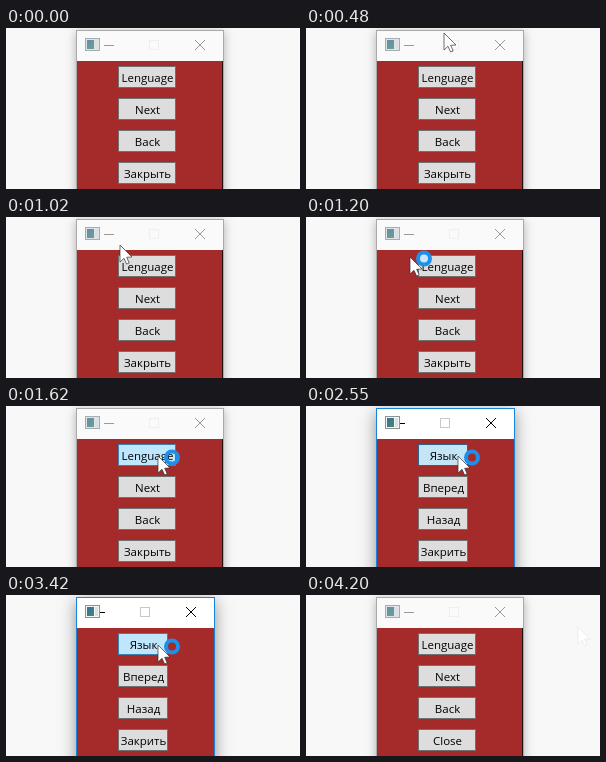
Animation, 294 px wide and 161 px high, one loop 4.29 s. Source, as an HTML page with a canvas:

```html
<!DOCTYPE html>
<html lang="ru">
<head>
<meta charset="utf-8">
<title>Language switch</title>
<style>
html, body { margin: 0; width: 100%; height: 100%; overflow: hidden; background: #f8f8f8; }
canvas { display: block; width: 294px; height: 161px; }
</style>
</head>
<body>
<canvas id="stage" width="294" height="161"></canvas>
<script>
const ctx = document.getElementById('stage').getContext('2d');
const LOOP = 4290, STEP = 30, PRESS = 90;
const CLICKS = [1890, 2550, 3090];
const ENTER = 180, BUSY = 1170, ARRIVE = 1200, LEAVE = 3390, RESET = 4200;
const BLUE = '#1f8fe8';

const LABELS = {
  start: ['Lenguage', 'Next', 'Back', 'Закрыть'],
  en: ['Lenguage', 'Next', 'Back', 'Close'],
  local: ['Язык', 'Вперед', 'Назад', 'Закрить']
};

const BUTTON = {
  idle: ['#ddd', '#707070'],
  hover: ['#bee6fd', '#3c7fb1'],
  pressed: ['#c4e5f6', '#2c628b']
};

function rect(x, y, w, h, color) {
  ctx.fillStyle = color;
  ctx.fillRect(x, y, w, h);
}

function frame(x, y, w, h, color) {
  ctx.strokeStyle = color;
  ctx.lineWidth = 1;
  ctx.strokeRect(x + 0.5, y + 0.5, w - 1, h - 1);
}

function line(x1, y1, x2, y2, color) {
  ctx.strokeStyle = color;
  ctx.lineWidth = 1;
  ctx.beginPath();
  ctx.moveTo(x1, y1);
  ctx.lineTo(x2, y2);
  ctx.stroke();
}

const ramp = (t, from, to) => Math.min(1, Math.max(0, (t - from) / (to - from)));
const mix = (a, b, k) => ({ x: a.x + (b.x - a.x) * k, y: a.y + (b.y - a.y) * k });

// Shrinking loops that drift left towards the first button
function swirl(t) {
  const k = ramp(t, ENTER, ARRIVE);
  const turn = 4 * Math.PI * k;
  return {
    x: 98 + 102 * (1 - k ** 1.6) + (76 - 70 * k) * Math.cos(turn),
    y: 27 + 24 * Math.cos(2 * Math.PI * (Math.min(t, ARRIVE) - 679) / 450)
  };
}

function pointerAt(t) {
  if (t < ENTER) return null;
  let p = swirl(t);
  p = mix(p, { x: 149, y: 44 }, ramp(t, ARRIVE, 1320));
  p = mix(p, { x: 152, y: 50 }, ramp(t, 1530, 1620));
  p = mix(p, { x: 272, y: 32 }, ramp(t, LEAVE, 3690) ** 3);
  return { x: Math.round(p.x), y: Math.round(p.y) };
}

// Each click holds the button briefly, then toggles the language on release
function stateAt(t) {
  if (t >= RESET) return { lang: 'en', active: false, pressed: false };
  const released = CLICKS.filter(c => t >= c + PRESS).length;
  return {
    lang: released === 0 ? 'start' : released % 2 ? 'local' : 'en',
    active: t >= CLICKS[0],
    pressed: CLICKS.some(c => t >= c && t < c + PRESS)
  };
}

function drawIcon(active) {
  ctx.globalAlpha = active ? 1 : 0.75;
  rect(79, 10, 15, 13, '#8b9298');
  rect(80, 11, 13, 11, '#f4f7f8');
  const g = ctx.createLinearGradient(81, 12, 88, 21);
  g.addColorStop(0, '#3b6f9c');
  g.addColorStop(1, '#3f8b72');
  rect(81, 12, 7, 9, g);
  rect(89, 12, 3, 9, '#d9e1e5');
  ctx.globalAlpha = 1;
}

function drawWindow(right, active) {
  const w = right - 70;
  ctx.save();
  ctx.shadowColor = `rgba(0,0,0,${active ? 0.42 : 0.3})`;
  ctx.shadowBlur = active ? 15 : 9;
  ctx.shadowOffsetY = active ? 4 : 2;
  rect(70, 2, w, 180, active ? '#fff' : '#fafafb');
  ctx.restore();

  rect(71, 33, w - 2, 128, '#a52a2a');
  frame(70, 2, w, 180, active ? '#1883d7' : '#a9a9a9');
  if (!active) rect(right - 2, 33, 1, 128, '#1c1010');

  const ink = active ? '#000' : '#999';
  const close = right - 24;
  line(Math.max(94, right - 120), 17.5, right - 110, 17.5, ink);
  frame(right - 75, 12, 10, 10, active ? '#c8c8c8' : '#efefef');
  line(close - 5, 12, close + 5, 22, ink);
  line(close + 5, 12, close - 5, 22, ink);
  drawIcon(active);
}

function drawButton(label, y, w, mode) {
  const [fill, edge] = BUTTON[mode];
  rect(112, y, w, 22, fill);
  frame(112, y, w, 22, edge);
  ctx.fillStyle = '#000';
  ctx.fillText(label, 112.5 + w / 2, y + 16);
}

function drawPointer({ x, y }) {
  const shape = [[0, 0], [0, 17], [4, 13.3], [6.6, 19], [9.2, 18], [6.7, 12.3], [12, 12]];
  ctx.beginPath();
  shape.forEach(([dx, dy]) => ctx.lineTo(x + dx, y + dy));
  ctx.closePath();
  ctx.fillStyle = '#fff';
  ctx.fill();
  ctx.lineWidth = 0.7;
  ctx.strokeStyle = x > 225 ? '#e6e6e6' : '#333';
  ctx.stroke();
}

function drawBusy({ x, y }, starting) {
  ctx.beginPath();
  ctx.arc(x + 14, y + 1.5, 6, 0, Math.PI * 2);
  if (starting) {
    ctx.fillStyle = '#c9e8fb';
    ctx.fill();
  }
  ctx.lineWidth = 4;
  ctx.strokeStyle = BLUE;
  ctx.stroke();
}

function draw(t) {
  const { lang, active, pressed } = stateAt(t);
  const narrow = lang === 'local';
  const w = narrow ? 50 : 58;
  const p = pointerAt(t);

  rect(0, 0, 294, 161, '#f8f8f8');
  drawWindow(narrow ? 209 : 218, active);

  ctx.font = '11.5px "Open Sans", "Noto Sans", sans-serif';
  ctx.textAlign = 'center';
  LABELS[lang].forEach((label, i) => {
    const y = 38 + i * 32;
    const over = p && p.x >= 112 && p.x < 112 + w && p.y >= y && p.y < y + 22;
    drawButton(label, y, w, !over ? 'idle' : pressed ? 'pressed' : 'hover');
  });

  if (!p) return;
  drawPointer(p);
  if (t >= BUSY && t < 3600) drawBusy(p, t < 1260);
}

const begin = performance.now();
function tick() {
  const t = (performance.now() - begin) % LOOP;
  draw(Math.floor(t / STEP) * STEP);
  requestAnimationFrame(tick);
}
tick();
</script>
</body>
</html>
```
